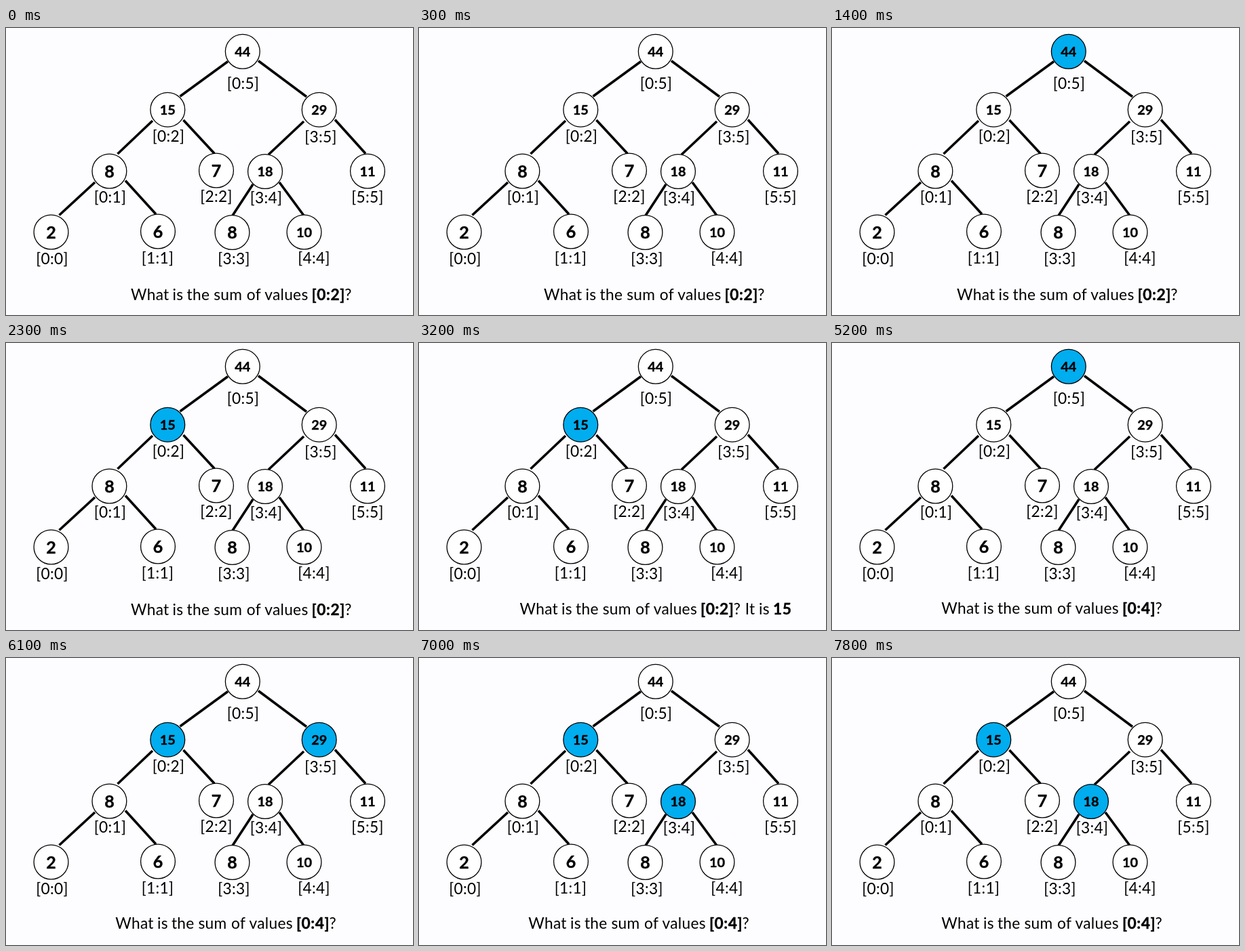
Write an HTML page that moves like this. It is 600 px wide and 424 px high and loops after 8000 ms.

```html
<!DOCTYPE html>
<html lang="en">
<head>
<meta charset="utf-8">
<title>Segment tree range sums</title>
<style>
  html, body { margin: 0; width: 100%; height: 100%; overflow: hidden; background: #fdfcfe; }
  svg { display: block; width: 600px; height: 424px; }
  text { font-family: Lato, sans-serif; fill: #000; }
  line { stroke: #000; stroke-width: 3.6; }
  circle { fill: #fff; stroke: #000; stroke-width: 1.3; }
  circle.on { fill: #00adef; }
  .range, .question { font-size: 22.7px; letter-spacing: .3px; }
  .range, .value { text-anchor: middle; }
  .value, .bold { font-weight: 700; stroke: #000; stroke-width: .4px; }
  .bold { letter-spacing: .6px; }
</style>
</head>
<body>
<svg id="stage" viewBox="0 0 600 424"></svg>
<script>
const LOOP = 8000;
const stage = document.getElementById('stage');

// key: centre x, centre y, value, label x, label y
const nodes = {
  '0:5': [348.8, 34.8, 44, 349.5, 83],
  '0:2': [238.3, 120.7, 15, 239.5, 161],
  '3:5': [461.7, 120.7, 29, 464, 162],
  '0:1': [152.4, 211.5, 8, 153.5, 251],
  '2:2': [310, 210.5, 7, 310, 249.5],
  '3:4': [382, 212, 18, 383.5, 251.5],
  '5:5': [533, 211.5, 11, 533, 250.5],
  '0:0': [66.5, 301.5, 2, 68, 342],
  '1:1': [224, 300.5, 6, 223.5, 340.5],
  '3:3': [333.5, 302, 8, 336, 342],
  '4:4': [439.5, 301.5, 10, 454, 341]
};

const edges = [
  [327, 49.5, 256.5, 101], [372, 48.5, 443, 101.5],
  [216, 137, 164.5, 186], [261.5, 136, 307.3, 185.5],
  [439, 138, 387, 187], [485, 135.5, 530, 185.5],
  [131, 228, 78.5, 276.5], [176, 225.5, 221, 275],
  [364, 231, 334, 277], [403, 228, 439, 277]
];

// start time, lit nodes, question, its x and baseline
const steps = [
  [0, [], 'first', 184, 402],
  [1400, ['0:5'], 'first', 184, 402],
  [2200, ['0:2'], 'first', 184, 402],
  [3100, ['0:2'], 'answer', 148.5, 400.5],
  [4100, [], 'second', 161.3, 399.5],
  [5200, ['0:5'], 'second', 161.3, 399.5],
  [6100, ['0:2', '3:5'], 'second', 161.3, 399.5],
  [7000, ['0:2', '3:4'], 'second', 161.3, 399.5]
];

const ask = range => [
  ['What', 0], ['is', 61.6], ['the', 82.6], ['sum', 122.2], ['of', 170.8],
  ['values', 197.2], [range, 266.6, true], ['?', 315.2]
];
const questions = {
  first: ask('[0:2]'),
  answer: [...ask('[0:2]'), ['It', 332.2], ['is', 352.6], ['15', 373.6, true]],
  second: ask('[0:4]')
};

function add(parent, tag, attrs, content = '') {
  const el = document.createElementNS('http://www.w3.org/2000/svg', tag);
  for (const name in attrs) el.setAttribute(name, attrs[name]);
  el.textContent = content;
  return parent.appendChild(el);
}

for (const [x1, y1, x2, y2] of edges) add(stage, 'line', { x1, y1, x2, y2 });

const discs = {};
for (const [key, [cx, cy, value, lx, ly]] of Object.entries(nodes)) {
  const size = value < 10 ? 25 : 19.9;
  discs[key] = add(stage, 'circle', { cx, cy, r: 25.4 });
  add(stage, 'text', { class: 'value', x: cx, y: cy + size * .36, 'font-size': size }, value);
  add(stage, 'text', { class: 'range', x: lx, y: ly + 7.3 }, `[${key}]`);
}

const question = add(stage, 'text', { class: 'question' });
let shown = null;

function show(step) {
  if (step === shown) return;
  shown = step;
  const [, lit, name, x, y] = step;
  for (const key in discs) discs[key].classList.toggle('on', lit.includes(key));
  question.textContent = '';
  for (const [word, dx, bold] of questions[name]) {
    add(question, 'tspan', { x: x + dx, y, class: bold ? 'bold' : '' }, word);
  }
}

const start = performance.now();
function tick(now) {
  const t = Math.max(0, now - start) % LOOP;
  show(steps.findLast(step => step[0] <= t));
  requestAnimationFrame(tick);
}
show(steps[0]);
requestAnimationFrame(tick);
</script>
</body>
</html>
```
